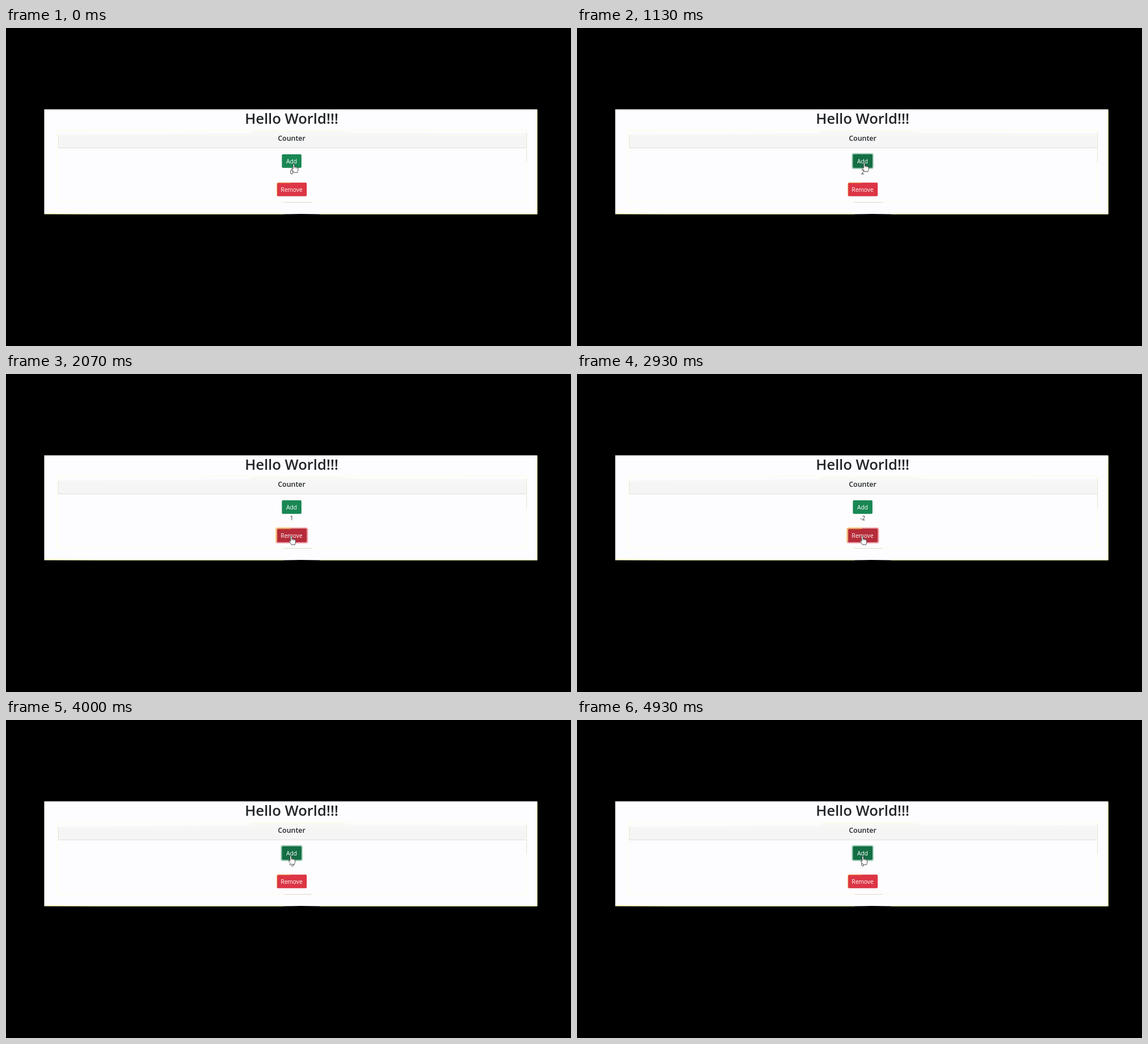
An HTML page for the animation above (4.96 s loop, 998 by 561 pixels).

```html
<!DOCTYPE html>
<html lang="en">
<head>
<meta charset="utf-8">
<title>Counter</title>
<style>
  html, body { margin: 0; width: 100%; height: 100%; overflow: hidden; background: #000; }
  svg { display: block; width: 100%; height: 100%; }
  text { font-family: "Open Sans", "Noto Sans", sans-serif; text-anchor: middle; fill: #212529; }
  .label { fill: #fff; font-size: 10.2px; }
</style>
</head>
<body>
<svg viewBox="0 0 998 561">
  <defs>
    <linearGradient id="headerFill" x2="0" y2="1">
      <stop offset="0" stop-color="#f9f9f7"/>
      <stop offset=".5" stop-color="#f5f5f5"/>
    </linearGradient>
  </defs>

  <!-- page -->
  <path d="M67.5 143.5H938.5V328.5H555L520 328L490 328.5H67.5Z" fill="#fdfcfe"/>
  <path d="M68 327.5L160 328.2H490M555 328.2H938V146" fill="none" stroke="#ffff8c" stroke-width=".8"/>
  <text x="504.5" y="169" font-size="25.6" font-weight="600">Hello World!!!</text>

  <!-- card -->
  <path d="M92 188L428 186L434 180.5H590L610 185L919 186V211.5H92Z" fill="url(#headerFill)"/>
  <rect x="90.5" y="180.5" width="828.5" height="126.5" fill="none" stroke="#ffffe0"/>
  <path d="M92 211.5H919" stroke="#dedede"/>
  <path d="M92.5 189V211M919.5 184V236" stroke="#d8d8d4" stroke-width=".7"/>
  <path d="M490 307.5H540" stroke="#d2d2d2" stroke-width=".8"/>
  <text x="504.5" y="199" font-size="12.4" font-weight="600">Counter</text>

  <!-- buttons -->
  <rect id="addRing" x="485.3" y="220.7" width="38.6" height="28" rx="3.5" fill="#9dcdb5"/>
  <rect id="addFace" x="487.3" y="222.7" width="34.6" height="24" rx="2"/>
  <text class="label" x="504.5" y="238.6">Add</text>

  <text id="value" x="504.5" y="258.4" font-size="10"></text>

  <g id="removeRing">
    <rect x="476.3" y="270.8" width="57.2" height="28" rx="3.5" fill="#f0a3ab"/>
    <path d="M476.8 297V274Q476.8 271.3 479.5 271.3H503" fill="none" stroke="#fbe36a"/>
  </g>
  <rect id="removeFace" x="478.5" y="272.8" width="52.7" height="24" rx="2"/>
  <path d="M478.7 295V275Q478.7 273 481 273H503" fill="none" stroke="#f5d84e" stroke-width=".7"/>
  <text class="label" x="504.5" y="288.6">Remove</text>

  <!-- pointer, origin at the fingertip -->
  <g id="hand" stroke="#222" stroke-width=".8" stroke-linejoin="round">
    <path fill="#fff" d="M-1.3 9.3V1.2A1.2 1.2 0 0 1 1.1 1.2V5.6C1.4 4.6 3.3 4.7 3.4 6C3.8 5.2 5.5 5.4 5.6 6.6C6 5.9 7.5 6.2 7.6 7.5V11C7.6 12.5 6.6 13.2 6.5 15.2H.2C0 13.5-2.4 11.5-3.6 9.4C-4.4 7.9-2.8 7.2-1.3 9.3Z"/>
    <path fill="none" d="M1.1 5.6V7.6M3.4 6V7.8M5.6 6.6V8.2" stroke-width=".6"/>
  </g>
</svg>
<script>
const LOOP = 4960, FADE = 150;
const addClicks = [560, 880, 1200, 3870, 4150, 4430, 4710];
const removeClicks = [1540, 1870, 2200, 2550, 2880, 3200, 3530];

// time, x, y of the fingertip
const pointerPath = [
  [0, 508.3, 239.8], [1080, 507.5, 238.2], [1240, 507.5, 238.2],
  [1500, 504, 286], [3560, 504, 286],
  [3830, 503, 239.5], [4420, 503, 239.5], [4720, 505, 240], [LOOP, 505, 240]
];

const $ = id => document.getElementById(id);
const clamp = v => Math.min(1, Math.max(0, v));
const ease = v => v * v * (3 - 2 * v);
const countBefore = (clicks, t) => clicks.filter(c => c <= t).length;

// Fades in at each start and out at each end of the given spans.
const level = (t, ...spans) => Math.max(...spans.map(([on, off]) =>
  ease(clamp((t - on) / FADE)) - ease(clamp((t - off) / FADE))));

const mix = (a, b, k) => `rgb(${a.map((v, i) => Math.round(v + (b[i] - v) * k))})`;

function pointerAt(t) {
  const i = pointerPath.findIndex(p => p[0] > t);
  const [t0, x0, y0] = pointerPath[i - 1], [t1, x1, y1] = pointerPath[i];
  const k = ease((t - t0) / (t1 - t0));
  return [x0 + (x1 - x0) * k, y0 + (y1 - y0) * k];
}

function draw(now) {
  const t = now % LOOP;
  $("value").textContent = countBefore(addClicks, t) - countBefore(removeClicks, t);
  $("addFace").setAttribute("fill",
    mix([25, 135, 84], [20, 110, 68], level(t, [0, 1310], [3730, 2 * LOOP])));
  $("removeFace").setAttribute("fill",
    mix([220, 53, 69], [181, 43, 57], level(t, [1400, 3640])));
  $("addRing").setAttribute("opacity", level(t, [490, 1480], [3800, 2 * LOOP]));
  $("removeRing").setAttribute("opacity", level(t, [1480, 3800]));
  $("hand").setAttribute("transform", `translate(${pointerAt(t)})`);
}

const start = performance.now();
function tick() {
  draw(performance.now() - start);
  requestAnimationFrame(tick);
}
tick();
</script>
</body>
</html>
```
